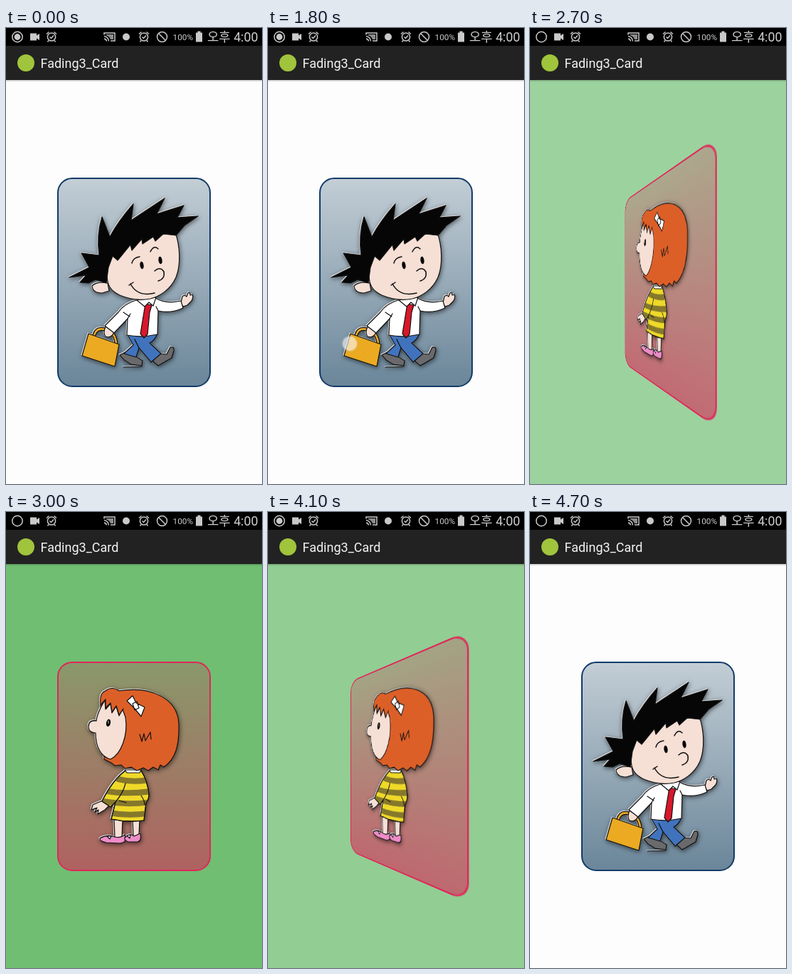
Recreate the animation shown at these times as an HTML page. Size 360 by 640 pixels, loop 4800 ms.

```html
<!DOCTYPE html>
<html lang="ko">
<head>
<meta charset="utf-8">
<title>Card flip</title>
<style>
  html, body { margin: 0; width: 100%; height: 100%; overflow: hidden; background: #fdfdfd; }
  #stage { position: relative; width: 360px; height: 640px; overflow: hidden; background: #fdfdfd; }
  #stage > svg { position: absolute; left: 0; top: 0; }
  #scene { position: absolute; left: 72px; top: 209.5px; width: 216px; height: 294px; perspective: 320px; }
  .card { position: absolute; left: 0; top: 0; width: 216px; height: 294px; overflow: visible; }
  .figure {
    stroke: #111; stroke-width: 1.2; stroke-linejoin: round; stroke-linecap: round;
    filter: drop-shadow(-1px -.6px 0 #d8d8d8) drop-shadow(1px 2px 3px rgba(0, 0, 0, .55));
  }
  .skin { fill: #f6dfd5; }
  .line { fill: none; }
  .ink { fill: #060606; }
  .eye { fill: #060606; stroke: none; }
  .shoe { fill: #6a6a6c; }
  .pink { fill: #ee8cc8; }
  .icons { stroke: #c9c9c9; stroke-width: 1.5; fill: none; }
  .solid { fill: #c9c9c9; stroke: none; }
  text { font-family: Roboto, "Noto Sans CJK KR", "Noto Sans CJK", sans-serif; }
</style>
</head>
<body>
<div id="stage">
  <div id="scene">
    <svg class="card" id="front" viewBox="72 209 216 294">
      <defs>
        <linearGradient id="blue" x2="0" y2="1">
          <stop stop-color="#0d3a5a" stop-opacity=".24"/>
          <stop offset="1" stop-color="#0d3a5a" stop-opacity=".61"/>
        </linearGradient>
      </defs>
      <rect x="73" y="210" width="214" height="292" rx="20" fill="url(#blue)" stroke="#123a69" stroke-width="2"/>
      <g class="figure">
        <path class="shoe" d="M160 458L168 454 183 460 192 466 191 473 176 471 166 465Z"/>
        <path class="line" d="M165 475L191 474"/>
        <path class="shoe" d="M206 466L216 456 226 457 231 447Q237 446 236 452L233 462 214 473Z"/>
        <path fill="#4173bd" d="M171 430L213 428Q209 438 202 441L218 456 204 468 187 448 183 461 166 456 179 444Z"/>
        <path class="line" d="M187 448L181 436"/>
        <path class="line" stroke-width="5" d="M124 430Q127 419 139 422 153 425 155 441"/>
        <path class="line" style="stroke:#ebaa22" stroke-width="2.6" d="M124 430Q127 419 139 422 153 425 155 441"/>
        <path fill="#ebaa22" d="M116 428L159 443 153 474 107 459Z"/>
        <path class="skin" d="M140 418Q136 427 140 432 148 435 152 426Z"/>
        <path class="skin" d="M246 385L248 376Q251 373 254 376L256 371Q259 369 259 374L262 373Q264 377 261 382L255 388 249 390Z"/>
        <path fill="#fff" d="M183 381Q166 386 158 398L139 417 152 427 171 407 170 430Q190 434 213 429L214 396Q232 400 249 392L246 382Q226 387 210 378Z"/>
        <path class="line" d="M171 407L175 400M165 398L174 404M214 396L211 390"/>
        <path fill="#d8172b" d="M196 386L205 388 202 398 199 429 194 434 189 428 194 398Z"/>
        <path fill="#fff" d="M184 381L195 390 201 384 207 389 211 377Z"/>
        <path class="skin" d="M143 357Q128 354 121 361 122 371 135 371L145 368Z"/>
        <path class="skin" d="M238 286C245 305 246 332 239 349C231 367 215 376 203 379C188 382 172 379 160 374C147 368 142 360 142 345L148 300Z"/>
        <path class="ink" d="M89 349L117 335 106 315 131 318Q127 290 135 264L146 292Q158 270 179 246L176 269 223 238 212 260 250 248 241 265 270 263 251 276 239 290 221 288 210 298 207 292 192 302 191 295 177 311 175 303 157 325 150 319 144 335 141 357 126 352 116 357 104 356 113 346Z"/>
        <g class="line" stroke-width="1.5">
          <path d="M177 329Q179 321 188 320M203 313Q208 303 214 309M173 360L179 356M175 358Q185 377 209 371"/>
          <path d="M209 340Q217 333 222 341 224 351 214 354"/>
        </g>
        <ellipse class="eye" cx="191" cy="332" rx="2.6" ry="5.4" transform="rotate(-8 191 332)"/>
        <ellipse class="eye" cx="217" cy="325" rx="2.6" ry="5.4" transform="rotate(-8 217 325)"/>
      </g>
    </svg>

    <svg class="card" id="back" viewBox="72 209 216 294">
      <defs>
        <linearGradient id="red" x2="0" y2="1">
          <stop stop-color="#dc2255" stop-opacity=".24"/>
          <stop offset="1" stop-color="#dc2255" stop-opacity=".59"/>
        </linearGradient>
        <path id="dress" d="M168 362L190 362Q199 376 201 395 201 403 197 407L194 432Q170 435 148 430L154 406 147 413 135 405Q150 375 168 362Z"/>
        <clipPath id="dressClip"><use href="#dress"/></clipPath>
      </defs>
      <rect x="73" y="210" width="214" height="292" rx="20" fill="url(#red)" stroke="#e0265a" stroke-width="2"/>
      <g class="figure">
        <path class="skin" d="M152 430L153 456 163 456 164 430ZM178 430L179 454 187 453 188 430Z"/>
        <path class="pink" d="M132 457Q142 451 153 455 161 457 167 452 171 463 160 464L141 463Q131 461 132 457Z"/>
        <path class="pink" d="M167 456Q176 449 180 454L189 450Q191 461 185 462L172 462Q166 460 167 456Z"/>
        <path fill="#fff" d="M142 454L148 454 146 458ZM170 453L175 452 174 457Z"/>
        <path class="skin" d="M136 404L122 410 120 417 128 414 125 420 130 417 129 423 139 417 145 411Z"/>
        <use href="#dress" fill="#efd929"/>
        <g clip-path="url(#dressClip)" class="line" style="stroke:#86782b" stroke-width="8">
          <path d="M158 374Q178 379 200 375M138 390Q166 396 204 391M136 405Q170 411 204 406M145 421Q170 426 200 422"/>
        </g>
        <use href="#dress" class="line"/>
        <path class="line" d="M168 380Q165 393 154 406M159 404L169 407M190 397Q195 404 195 410"/>
        <path fill="#fff" d="M167 361L190 361 188 365 170 365Z"/>
        <path fill="#dc5f28" d="M133 269Q131 253 140 250 149 243 159 250C202 243 241 259 243 296C244 328 238 346 222 357L217 354 214 361 207 357 200 362 193 358 184 362 176 357 167 359 162 354 153 355 148 351 138 346Z"/>
        <path class="skin" d="M134 272L139 263 140 276 147 268 149 281 155 272 159 285 164 276 168 287C172 312 162 339 147 346C135 343 126 331 126 309Q116 309 116 300 116 291 127 292 128 284 134 272Z"/>
        <path fill="#dc5f28" d="M133 270L140 262 140 274 147 267 149 280 155 271 159 284 165 275 164 260 140 253Z" stroke="none"/>
        <path class="line" d="M133 270L140 262 140 274 147 267 149 280 155 271 159 284 165 275M127 292Q121 291 118 294"/>
        <ellipse class="eye" cx="144" cy="295" rx="3" ry="5.2" transform="rotate(12 144 295)"/>
        <ellipse cx="144" cy="294" rx=".9" ry="2.4" fill="#887" stroke="none"/>
        <path class="line" d="M188 311L191 321 194 310 196 320 203 308 204 318"/>
        <path fill="#fff" d="M170 264L178 257 183 267 195 273 190 286 181 275ZM178 268L184 265 187 274 181 277Z"/>
      </g>
    </svg>
  </div>

  <svg width="360" height="640" viewBox="0 0 360 640">
    <defs>
      <linearGradient id="shade" x2="0" y2="1">
        <stop stop-opacity=".2"/>
        <stop offset="1" stop-opacity="0"/>
      </linearGradient>
      <g id="alarm">
        <circle r="5.6"/>
        <path d="M-7 -4L-3.5 -7M7 -4L3.5 -7M-4 5L-5.5 7M4 5L5.5 7M-2.5 0L-.5 2 3 -2"/>
      </g>
    </defs>
    <rect width="360" height="26" fill="#000"/>
    <rect y="25" width="360" height="48" fill="#222"/>
    <rect y="73" width="360" height="3" fill="url(#shade)"/>
    <g class="icons" transform="translate(0 -.5)">
      <circle cx="16" cy="13" r="7.2"/>
      <circle id="rec" class="solid" cx="16" cy="13" r="4.4"/>
      <path class="solid" d="M34 8H43V11L47 8.5V17.5L43 15V18H34Z"/>
      <use href="#alarm" x="64" y="13"/>
      <path d="M138 10V7.5H153V18.5H147M138 12Q144 13 144.5 19M138 15.5Q141 16 141.5 19"/>
      <path class="solid" d="M141 9.5H151V16.5H147Q145 11.5 141 11Z" opacity=".7"/>
      <circle class="solid" cx="169" cy="13" r="5"/>
      <use href="#alarm" x="194" y="13"/>
      <circle cx="219.5" cy="13" r="7"/>
      <path d="M214.5 8L224.5 18"/>
      <path class="solid" d="M267 7H269.5V5H273.5V7H276V20H267Z"/>
    </g>
    <text x="234.5" y="17" font-size="11.8" fill="#c9c9c9">100%</text>
    <text x="283" y="19" font-size="17.8" fill="#cfcfcf">오후 4:00</text>
    <circle cx="28" cy="49" r="12" fill="#a0c43c"/>
    <text x="48.5" y="56" font-size="18" fill="#f4f4f4">Fading3_Card</text>
    <g id="touch">
      <circle r="11.5" fill="#ddd" opacity=".25"/>
      <circle r="10" fill="#fff" opacity=".5"/>
    </g>
  </svg>
</div>
<script>
  const LOOP = 4800, STEP = 100, FLIP = 760, OPEN = 2179, CLOSE = 3918;
  const WHITE = [253, 253, 253], GREEN = [112, 190, 114];
  const touches = [
    { from: 1800, to: 2200, x: 115, y: 443 },
    { from: 3600, to: 3900, x: 236, y: 420 }
  ];
  const [stage, front, back, rec, touch] =
    ['stage', 'front', 'back', 'rec', 'touch'].map(id => document.getElementById(id));
  const progress = (t, start) => Math.min(1, Math.max(0, (t - start) / FLIP));
  const show = (el, on) => { el.style.display = on ? '' : 'none'; };

  function draw(t) {
    const p = progress(t, OPEN) - progress(t, CLOSE);
    const angle = p * 180;
    front.style.transform = `rotateY(${angle}deg)`;
    back.style.transform = `rotateY(${angle - 180}deg)`;
    show(front, angle < 90);
    show(back, angle >= 90);
    stage.style.background = `rgb(${WHITE.map((w, i) => Math.round(w + (GREEN[i] - w) * p))})`;

    // The recording light toggles once a second.
    show(rec, Math.floor((t + 800) / 1000) % 2 === 0);

    const press = touches.find(({ from, to }) => t >= from && t < to);
    show(touch, press);
    if (press) touch.setAttribute('transform', `translate(${press.x} ${press.y})`);
  }

  const began = performance.now();
  function tick() {
    const t = (performance.now() - began) % LOOP;
    draw(Math.floor(t / STEP) * STEP);
    requestAnimationFrame(tick);
  }
  draw(0);
  requestAnimationFrame(tick);
</script>
</body>
</html>
```
